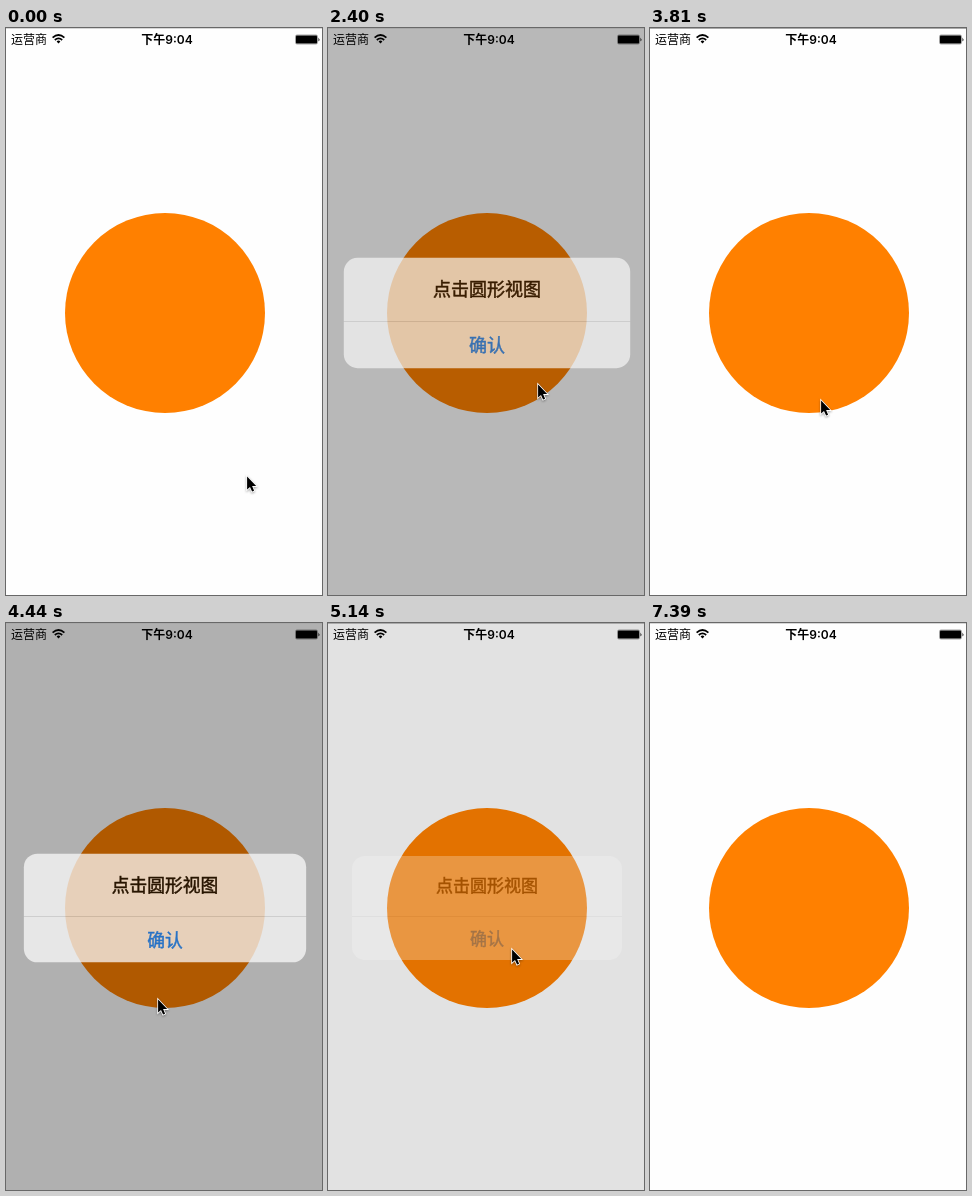
An HTML page that plays this animation: 316x567 px, repeating every 7.49 s.

```html
<!DOCTYPE html>
<html lang="zh-CN">
<head>
<meta charset="utf-8">
<title>圆形视图</title>
<style>
  html, body { margin: 0; width: 100%; height: 100%; overflow: hidden; background: #fefefe; }
  svg { display: block; }
  text { font-family: Inter, "Noto Sans CJK SC", "Noto Sans CJK", sans-serif; }
  .alert-text { font-size: 17px; text-anchor: middle; stroke-width: .45; }
  #cursor { filter: drop-shadow(0 1px 1px rgba(0, 0, 0, .35)); }
</style>
</head>
<body>
<svg width="316" height="567" viewBox="0 0 316 567">
  <defs>
    <radialGradient id="frostFill" gradientUnits="userSpaceOnUse" r="140"
                    gradientTransform="translate(159 285) scale(1 1.3)" cx="0" cy="0">
      <stop offset=".705" stop-color="#fce3c4"/>
      <stop offset=".725" stop-color="#f0e8e0"/>
      <stop offset=".83" stop-color="#f0ebe6"/>
      <stop offset=".84" stop-color="#f3f3f3"/>
      <stop offset="1" stop-color="#f6f6f6"/>
    </radialGradient>
  </defs>
  <rect width="316" height="567" fill="#fefefe"/>

  <!-- status bar -->
  <text x="5" y="15.5" font-size="12">运营商</text>
  <g fill="none" stroke="#000" stroke-width="1.7">
    <path d="M46.6 9.6Q52.5 4.4 58.4 9.6M48.8 12Q52.5 8.8 56.2 12"/>
    <path d="M50.6 13.4Q52.5 11.8 54.4 13.4L52.5 15.6Z" fill="#000" stroke="none"/>
  </g>
  <text x="161" y="15.5" font-size="12" font-weight="600" text-anchor="middle">下午9:04</text>
  <rect x="289.5" y="7" width="22" height="9" rx="1.5" fill="none" stroke="#000" stroke-width=".6" stroke-opacity=".6"/>
  <rect x="290" y="7.5" width="21" height="8" rx=".8"/>
  <path d="M312.5 9.5Q314.3 11.5 312.5 13.5Z"/>

  <circle cx="159" cy="285" r="100" fill="#ff8000"/>
  <rect id="dim" width="316" height="567"/>

  <g id="alert">
    <rect x="24" y="233" width="270" height="104" rx="13" fill="#f9f9f9" fill-opacity=".97"/>
    <rect id="frost" x="24" y="233" width="270" height="104" rx="13" fill="url(#frostFill)"/>
    <rect x="24" y="293" width="270" height=".5" fill-opacity=".25"/>
    <text class="alert-text" x="159" y="269.3" stroke="#000">点击圆形视图</text>
    <text class="alert-text" x="159" y="322" fill="#007aff" stroke="#007aff">确认</text>
  </g>

  <rect id="edge" width="316" height="1"/>
  <path id="cursor" d="M1.1 1.6V14.6L4 11.9L6.1 16.6L8.1 15.7L6.1 11.1H10.2Z"
        stroke="#fff" stroke-width="1.6" paint-order="stroke"/>
</svg>
<script>
const LOOP = 7490;
const GLIDE = 220;
const el = id => document.getElementById(id);
const [dim, alertBox, frost, edge, cursor] = ['dim', 'alert', 'frost', 'edge', 'cursor'].map(el);

// resting places of the pointer tip and when it arrives there
const stops = [
  { at: 0, x: 240, y: 447 }, { at: 240, x: 260, y: 416 }, { at: 740, x: 253, y: 369 },
  { at: 1360, x: 223, y: 369 }, { at: 1990, x: 209, y: 355 }, { at: 2880, x: 198, y: 326 },
  { at: 3800, x: 170, y: 371 }, { at: 4120, x: 151, y: 375 }, { at: 4820, x: 183, y: 325 },
  { at: 5490, x: 199, y: 382 }, { at: 6230, x: 219, y: 382 }, { at: 6800, x: 271, y: 552 },
  { at: 7120, x: 277, y: 569 }
];
const alerts = [{ show: 2280, hide: 3070 }, { show: 4300, hide: 5012 }];

// critically damped spring, 0 to 1
function spring(ms) {
  const x = Math.max(0, ms) / 50;
  const p = 1 - Math.exp(-x) * (1 + x);
  return p > .992 ? 1 : p;
}

function smooth(u) {
  u = Math.min(1, Math.max(0, u));
  return u * u * (3 - 2 * u);
}

function pointerAt(t) {
  let { x, y } = stops[0];
  for (const stop of stops) {
    const e = smooth((t - stop.at) / GLIDE + 1);
    x += (stop.x - x) * e;
    y += (stop.y - y) * e;
  }
  return [Math.round(x), Math.round(y)];
}

function draw(t) {
  const { show, hide } = alerts.findLast(a => t >= a.show) || alerts[0];
  const shown = spring(t - show);
  const level = shown * (1 - spring(t - hide));
  const scale = 1.2 - .2 * shown;
  dim.setAttribute('opacity', .4 * level);
  alertBox.setAttribute('opacity', level);
  alertBox.setAttribute('transform',
    `translate(159 285) scale(${scale}) translate(-159 -285)`);
  frost.setAttribute('opacity', level === 1 ? 1 : 0);
  edge.setAttribute('fill', t >= 570 && t < 7390 ? '#a9a9a9' : '#d6d6d6');
  cursor.setAttribute('transform', `translate(${pointerAt(t)})`);
}

const start = performance.now();
function tick() {
  draw((performance.now() - start) % LOOP);
  requestAnimationFrame(tick);
}
tick();
</script>
</body>
</html>
```
